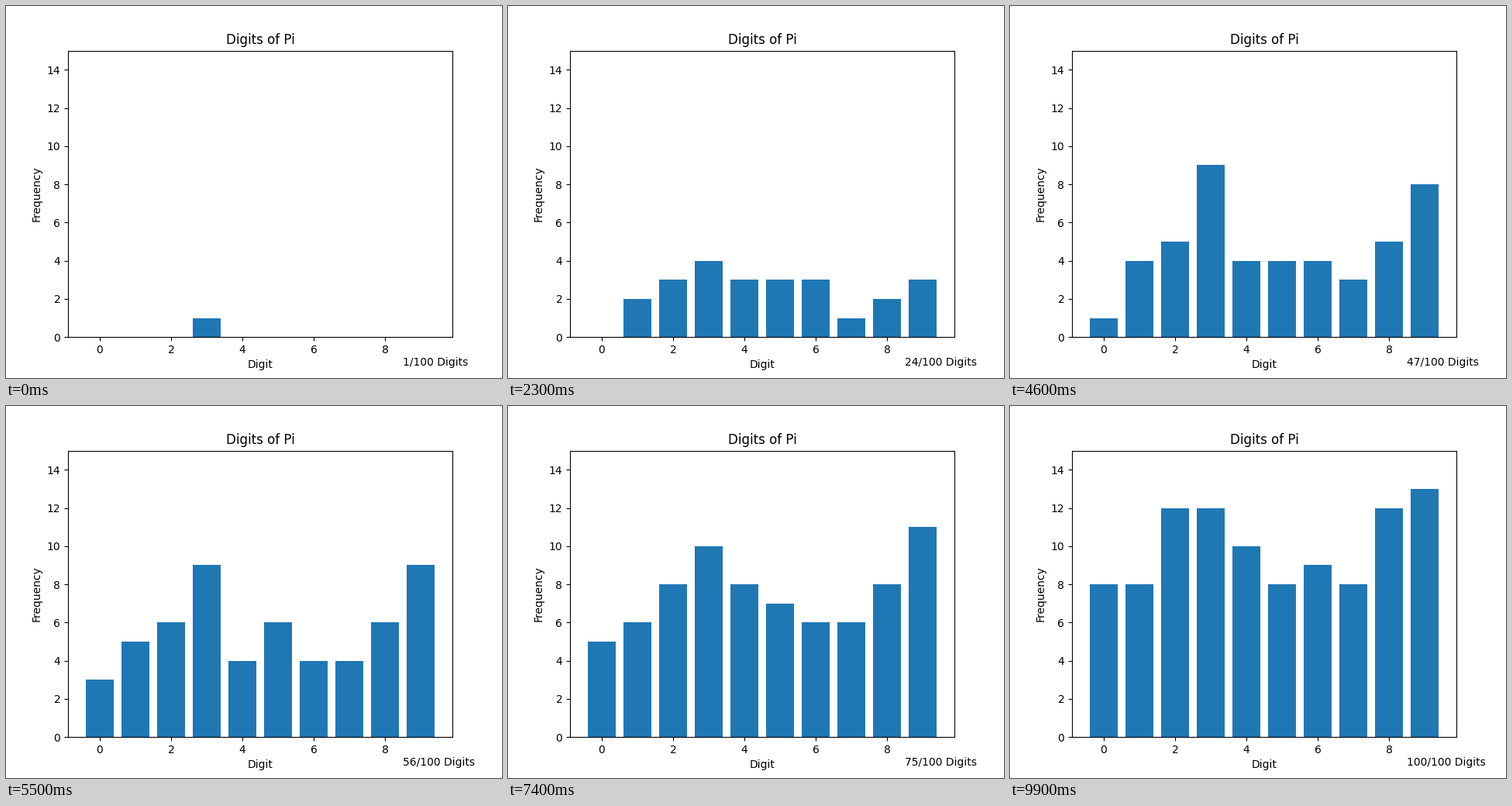
These frames come from a looping animation (640x480 px, 10000 ms). A matplotlib script:

```python
import matplotlib.pyplot as plt
from matplotlib.animation import FuncAnimation

TOTAL = 100


def arccot(x, unity):
    """Integer arccot(x) scaled by unity."""
    term = total = unity // x
    n, sign = 3, -1
    while term:
        term //= x * x
        total += sign * (term // n)
        n, sign = n + 2, -sign
    return total


def pi_digits(count):
    unity = 10 ** (count + 10)
    pi = 4 * (4 * arccot(5, unity) - arccot(239, unity))
    return [int(c) for c in str(pi)[:count]]


digits = pi_digits(TOTAL)

fig, ax = plt.subplots(figsize=(6.4, 4.8), dpi=100)
bars = ax.bar(range(10), [0] * 10, color="#1f77b4")
ax.set_xlim(-0.89, 9.89)
ax.set_ylim(0, 15)
ax.set_title("Digits of Pi")
ax.set_xlabel("Digit")
ax.set_ylabel("Frequency")
counter = ax.text(8.5, -1.5, "")


def update(i):
    seen = digits[:i + 1]
    for d, bar in enumerate(bars):
        bar.set_height(seen.count(d))
    counter.set_text(f"{len(seen)}/{TOTAL} Digits")
    return [*bars, counter]


anim = FuncAnimation(fig, update, frames=TOTAL, interval=100,
                     repeat=True, repeat_delay=0, blit=False)
plt.show()
```
